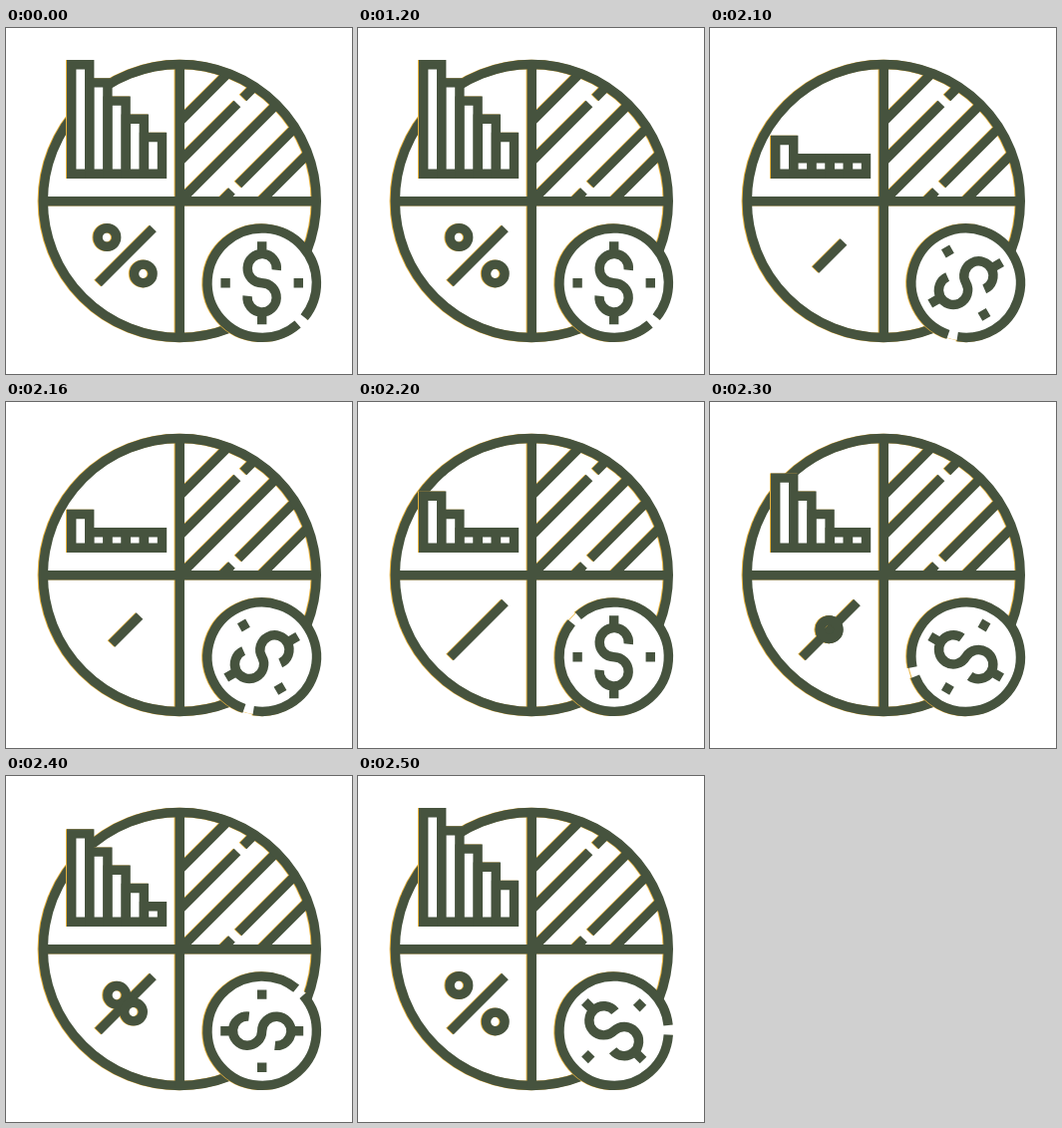
These frames come from a looping animation (347x347 px, 2.6 s). An HTML page:

```html
<!DOCTYPE html>
<html lang="en">
<head>
<meta charset="utf-8">
<title>Finance chart icon</title>
<style>
  html, body { margin: 0; width: 100%; height: 100%; overflow: hidden; background: #fff; }
  svg { display: block; width: 100vw; height: 100vh; }
  .ink { fill: none; stroke: #46533e; stroke-width: 9.4; filter: drop-shadow(-.5px .5px 0 #e8b23c); }
  .solid { fill: #46533e; stroke: none; }
  .paper { fill: #fff; stroke: none; }
</style>
</head>
<body>
<svg viewBox="0 0 347 347">
  <defs>
    <clipPath id="quadrant"><path d="M174 174V36.5A137 137 0 0 1 311 174Z"/></clipPath>
  </defs>
  <g class="ink">
    <g clip-path="url(#quadrant)">
      <path d="M170 98L230 38M170 138L232 76M238 70L260 48M170 178L280 68M212 178L226.5 163.5M233 157L300 90M250 179L320 109"/>
    </g>
    <circle cx="174.3" cy="173.5" r="137"/>
    <path d="M174.3 36V311M37 173.7H311"/>
  </g>
  <g class="ink" id="bars"></g>
  <g class="ink">
    <path id="slash"/>
    <circle class="ring" r="9.3"/>
    <circle class="ring" r="9.3"/>
  </g>
  <g class="ink">
    <g id="coin">
      <circle class="paper" r="58"/>
      <circle r="54.7" pathLength="360" stroke-dasharray="350 10" transform="rotate(49)"/>
      <path d="M14.6 -13A14.6 14.6 0 1 0 0 0A14.6 14.6 0 1 1 -14.6 13M0 -41.5V-29M0 29V41.5"/>
      <path class="solid" d="M-41.3 -4.7h9.4v9.4h-9.4zM31.9 -4.7h9.4v9.4h-9.4z"/>
    </g>
  </g>
</svg>
<script>
  const LOOP = 2600, HOLD = 2000, STEP = 100;
  const BAR_COUNT = 5, PITCH = 18.2, BASE = 146.3;

  // slash: half extent, ring: offset from the slash centre (null = hidden)
  const poses = [
    { rise: 0, slash: 7.5, ring: null, turn: 0 },
    { rise: 1, slash: 14, ring: null, turn: 60 },
    { rise: 2, slash: 27.5, ring: null, turn: 180 },
    { rise: 3, slash: 27.5, ring: 0, turn: 120 },
    { rise: 4, slash: 27.5, ring: 8.4, turn: 270 },
    { rise: 5, slash: 27.5, ring: 18.2, turn: 315 }
  ];
  const rest = { ...poses[5], turn: 0 };

  const $ = id => document.getElementById(id);
  const rings = document.querySelectorAll('.ring');
  const bars = Array.from({ length: BAR_COUNT }, () => {
    const bar = document.createElementNS('http://www.w3.org/2000/svg', 'path');
    bar.setAttribute('fill', '#fff');
    return $('bars').appendChild(bar);
  });

  function barTop(i, rise) {
    const top = rise === 5 ? 32 + PITCH * i : 126 - PITCH * Math.max(0, rise - i);
    return top + 4.7;
  }

  function draw({ rise, slash, ring, turn }) {
    bars.forEach((bar, i) => {
      const x = 65.7 + PITCH * i;
      bar.setAttribute('d', `M${x} ${barTop(i, rise)}h${PITCH - .2}V${BASE}H${x}Z`);
    });
    $('slash').setAttribute('d', `M${120 - slash} ${228.5 + slash}l${2 * slash} ${-2 * slash}`);
    rings.forEach((el, i) => {
      const d = (i ? 1 : -1) * ring;
      el.setAttribute('transform', `translate(${119.6 + d} ${228.2 + d})`);
      el.style.display = ring === null ? 'none' : '';
    });
    $('coin').setAttribute('transform', `translate(256.7 255.7) rotate(${turn})`);
  }

  const start = performance.now();
  let shown;
  function tick() {
    const t = (performance.now() - start) % LOOP;
    const pose = t < HOLD ? rest : poses[Math.floor((t - HOLD) / STEP)];
    if (pose !== shown) draw(shown = pose);
    requestAnimationFrame(tick);
  }
  tick();
</script>
</body>
</html>
```
